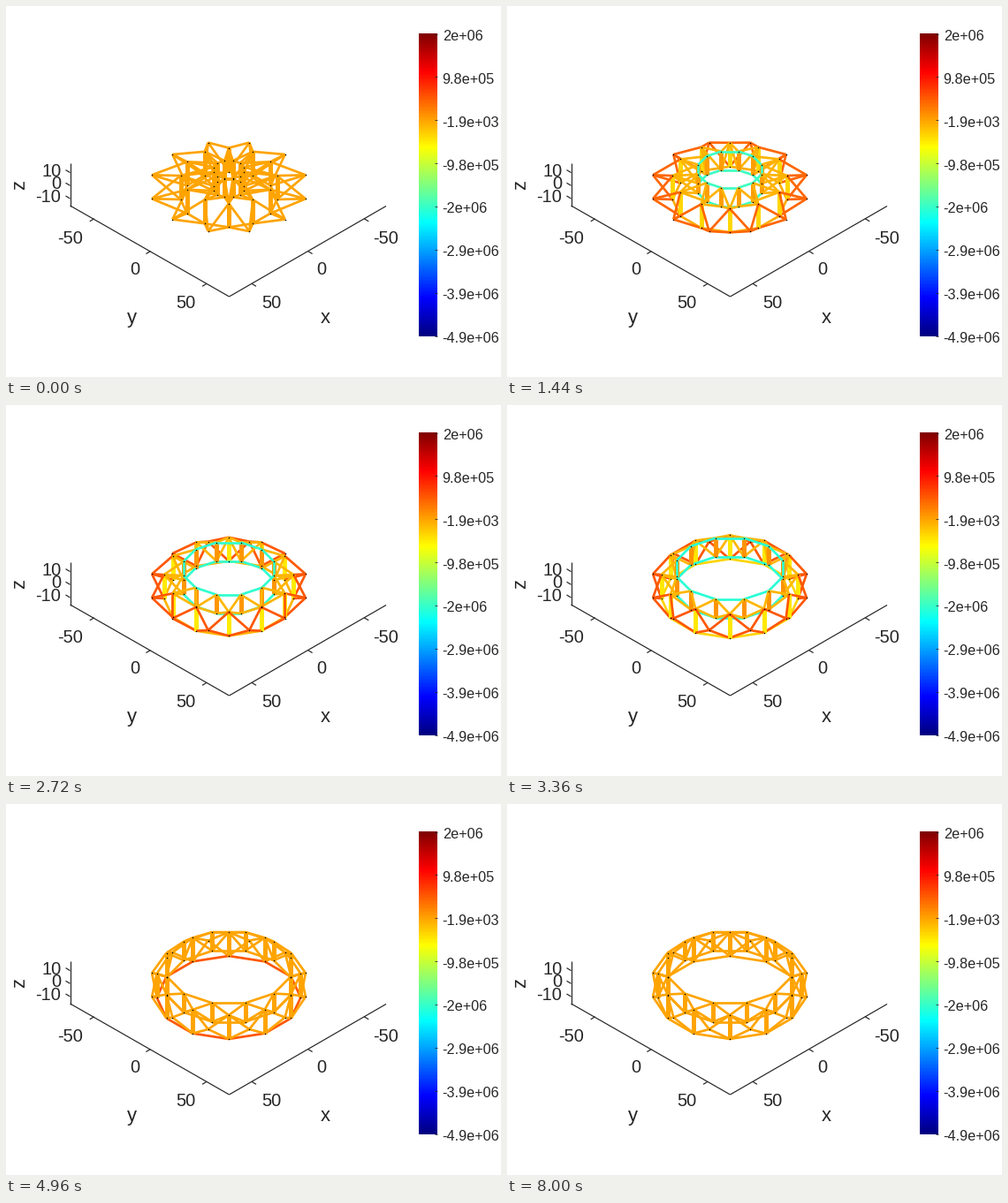
Write a matplotlib script that moves like this. It is 560x420 px and loops after 8.16 s.

```python
import numpy as np
import matplotlib.pyplot as plt
from matplotlib.animation import FuncAnimation
from matplotlib.collections import LineCollection

WIDTH, HEIGHT, DPI = 560, 420, 100
FRAMES, INTERVAL = 51, 160
PX = 72 / DPI
INK = "#262626"
CX, CY = 252, 204.8
TILT = 1 / np.sqrt(3)
BAYS = 12
REST = 0.714

plt.rcParams["font.family"] = "Liberation Sans"
fig = plt.figure(figsize=(WIDTH / DPI, HEIGHT / DPI), dpi=DPI, facecolor="white")
ax = fig.add_axes([0, 0, 1, 1])


def jet(level):
    """Symmetric jet scale: three trapezoids, one per colour channel."""
    level = np.asarray(level)[..., None]
    return np.clip(1.5 - np.abs(4 * level - np.array([3, 2, 1])), 0, 1)


def line(x0, y0, x1, y1, width=1.2):
    ax.plot([x0, x1], [y0, y1], color=INK, lw=width * PX, solid_capstyle="butt")


def label(x, y, text, size=20, **kw):
    kw.setdefault("ha", "center")
    ax.text(x, y, text, color=INK, fontsize=size * PX, va="baseline", **kw)


def draw_axes():
    line(252.5, 329, 430, 226.5)
    line(252.5, 329, 72.5, 226)
    line(72.5, 177.5, 72.5, 226.5)
    for value in (-50, 0, 50):
        along = 70 - value
        dx, y = 1.273 * along, 329 - 0.735 * along
        line(252.5 + dx, y, 257.5 + dx, y + 3)
        line(252.5 - dx, y, 247.5 - dx, y + 3)
    for x, y, text in ((430, 269, "-50"), (357, 304.5, "0"), (300, 342, "50")):
        label(x, y, text)
        label(503 - x, y, text)
    for value in (-10, 0, 10):
        y = 203.3 - 1.47 * value
        line(72.5, y, 67.5, y - 3)
        label(62.5, y + 4, str(value), ha="right")
    label(361, 359, "x", 22)
    label(142, 359, "y", 22)
    label(21.5, 202, "z", 22, rotation=90, rotation_mode="anchor")


def draw_colorbar():
    ax.imshow(jet(np.linspace(1, 0, 256))[:, None], aspect="auto",
              extent=(467, 488, 374, 31), interpolation="nearest")
    names = ("2e+06", "9.8e+05", "-1.9e+03", "-9.8e+05",
             "-2e+06", "-2.9e+06", "-3.9e+06", "-4.9e+06")
    for k, name in enumerate(names):
        y = 31.5 + 48.9 * k
        line(484.5, y, 488, y, 0.8)
        label(493.7, y + 7.3, name, 16.2, ha="left")


def ring(radius, lift, turn):
    """Screen x, y and nearness for one ring of joints."""
    a = np.radians(360 / BAYS * np.arange(BAYS) + turn)
    front = radius * np.sin(a)
    return np.column_stack([CX + radius * np.cos(a),
                            CY + front * TILT - lift,
                            front * 0.8165 + lift * 0.707])


# Level of each member group on the colour scale: (frames, levels).
LEVELS = {
    "outer": ([0, 4, 9, 17, 25, 29], [REST, 0.76, 0.775, 0.79, 0.79, REST]),
    "inner": ([0, 4, 9, 25, 29], [REST, 0.705, 0.70, 0.695, REST]),
    "hoop": ([0, 4, 9, 25, 29], [REST, 0.50, 0.435, 0.41, REST]),
    "base": ([0, 17, 25, 28, 31, 36], [REST, 0.70, 0.635, 0.78, 0.79, REST]),
    "mid strut": ([0, 4, 9, 17, 25, 29], [REST, 0.68, 0.665, 0.645, 0.65, REST]),
    "inner strut": ([0, 9, 25, 29], [REST, 0.72, 0.735, REST]),
}


def dome(frame):
    """Joints, member segments, levels and widths of the cable dome."""
    r_mid = np.interp(frame, [0, 9, 17, 25], [54.5, 64.6, 73.3, 81.4])
    r_in = np.interp(frame, [0, 9, 17, 25, 26], [18, 37, 53, 71.2, 72])
    rim = ring(90, 0, 15)
    mid_top, mid_low = ring(r_mid, 12.7, 0), ring(r_mid, -14.2, 0)
    in_top, in_low = ring(r_in, 19.6, 15), ring(r_in, -1.6, 15)

    segments, levels, widths = [], [], []

    def join(group, starts, ends, width=2.7):
        segments.extend(zip(starts, ends))
        levels.extend([np.interp(frame, *LEVELS[group])] * BAYS)
        widths.extend([width * PX] * BAYS)

    def following(joints):
        return np.roll(joints, -1, axis=0)

    for joints in (mid_top, mid_low):
        join("outer", rim, joints)
        join("outer", rim, following(joints))
    for joints in (in_top, in_low):
        join("inner", joints, mid_top)
        join("inner", joints, following(mid_top))
        join("hoop", joints, following(joints))
    join("base", mid_low, following(mid_low))
    join("mid strut", mid_top, mid_low, 5)
    join("inner strut", in_top, in_low, 5)

    segments = np.array(segments)
    order = np.argsort(segments[:, :, 2].mean(axis=1), kind="stable")
    joints = np.vstack([rim, mid_top, mid_low, in_top, in_low])
    return (joints[:, :2], segments[order, :, :2],
            np.array(levels)[order], np.array(widths)[order])


draw_colorbar()
draw_axes()
ax.set_xlim(0, WIDTH)
ax.set_ylim(HEIGHT, 0)
ax.axis("off")

members = LineCollection([], zorder=3)
ax.add_collection(members, autolim=False)
dots, = ax.plot([], [], "o", color="black", ms=1.5 * PX, mew=0, zorder=4)


def update(frame):
    joints, segments, levels, widths = dome(frame)
    members.set_segments(segments)
    members.set_color(jet(levels))
    members.set_linewidth(widths)
    dots.set_data(joints[:, 0], joints[:, 1])
    return members, dots


anim = FuncAnimation(fig, update, frames=FRAMES, interval=INTERVAL,
                     repeat=True, repeat_delay=0, blit=False)
plt.show()
```
